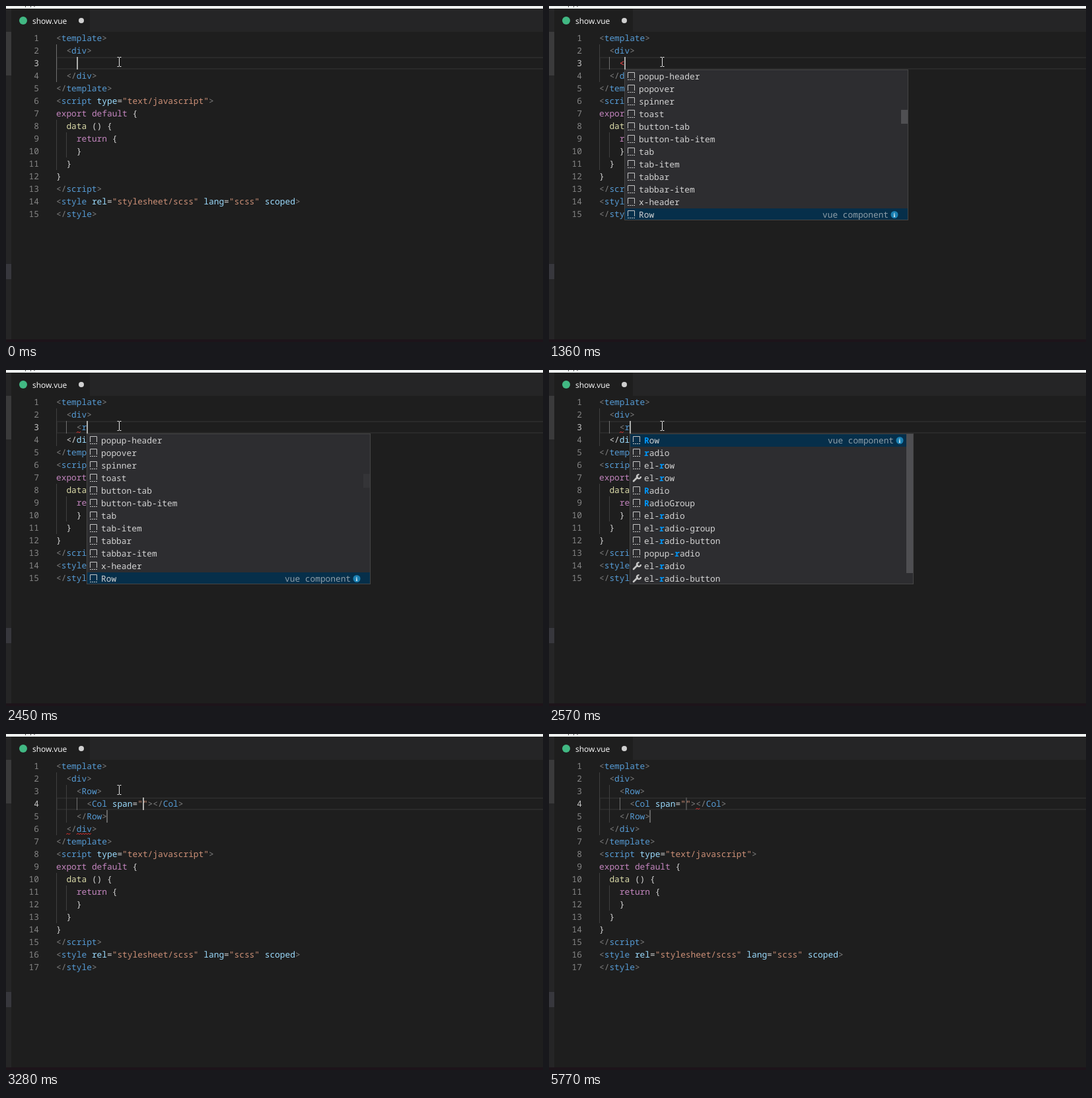
Write an HTML page that moves like this. It is 813 px wide and 508 px high and loops after 5.87 s.

```html
<!DOCTYPE html>
<html lang="en">
<head>
<meta charset="utf-8">
<title>Editor completion</title>
<style>
html, body { margin: 0; width: 100%; height: 100%; overflow: hidden; background: #1e1e1e; }
svg { display: block; }
text { font: 12.83px "Noto Sans Mono", "DejaVu Sans Mono", monospace; white-space: pre; text-rendering: geometricPrecision; }
text.ui { font: 12px "Open Sans", "Noto Sans", sans-serif; }
text.info { font: bold 8px "Noto Serif", serif; }
.hit { fill: #0097fb; font-weight: bold; }
</style>
</head>
<body>
<svg id="stage" width="813" height="508" viewBox="0 0 813 508"></svg>
<script>
const LOOP = 5870, LEFT = 76, TOP = 39, ROW = 19, CHAR = 7.7;

const tail = `</template>
<script type="text/javascript">
export default {
  data () {
    return {
    }
  }
}
<\/script>
<style rel="stylesheet/scss" lang="scss" scoped>
</style>`.split('\n');

const allTags = ['popup-header', 'popover', 'spinner', 'toast', 'button-tab', 'button-tab-item',
  'tab', 'tab-item', 'tabbar', 'tabbar-item', 'x-header', 'Row'];
const matches = ['Row', 'radio', 'el-row', '*el-row', 'Radio', 'RadioGroup', 'el-radio',
  'el-radio-group', 'el-radio-button', 'popup-radio', '*el-radio', '*el-radio-button'];

const fullMenu = { items: allTags, selected: 11, query: '', thumb: [157, 21, '#4f4f52'] };
const matchMenu = { items: matches, selected: 0, query: 'r', thumb: [97, 210, '#4f4f52'] };

// Each entry changes part of the editor state from its time on.
const steps = [
  [0, { typed: '', caret: 1, guide: 0, title: '#fff', waves: [], mouse: [171.5, 84] }],
  [560, { caret: 0 }],
  [960, { typed: '<', caret: 1 }],
  [1080, { guide: 2, invalid: 1 }],
  [1360, { menu: fullMenu }],
  [1510, { title: '#f48771', caret: 0 }],
  [1760, { title: '#fff', waves: [[2, 4, 1]] }],
  [2030, { caret: 1 }],
  [2450, { typed: '<r', invalid: 0, open: 1, menu: { ...fullMenu, thumb: [157, 21, '#343437'] } }],
  [2570, { menu: matchMenu }],
  [2690, { typed: '<ro', menu: { ...matchMenu, query: 'ro' } }],
  [3130, { caret: 0, waves: [[3, 2, 1], [3, 4, 3]] }],
  [3280, { done: 1, open: 0, menu: null, caret: 1, guide: 4, waves: [[5, 2, 1], [5, 4, 3]] }],
  [3780, { caret: 0, waves: [[3, 19, 1]] }],
  [4240, { caret: 1 }],
  [4810, { caret: 0 }],
  [5110, { mouse: [348.5, 282] }],
  [5230, { mouse: null, caret: 1 }],
  [5770, { caret: 0 }]
];

const syntax = [
  ['#808080', /<\/?|>/],
  ['#569cd6', /(?<=<\/?)\w+/],
  ['#ce9178', /".*?"/],
  ['#c586c0', /\b(?:export|default|return)\b/],
  ['#dcdcaa', /\bdata\b/],
  ['#9cdcfe', /\b(?:type|rel|lang|scoped|span)\b/],
  ['#d4d4d4', /[^\s<>"]/]
];
const tokens = new RegExp(syntax.map(([, re]) => `(${re.source})`).join('|'), 'g');

const colX = col => LEFT + col * CHAR;
const rowY = row => TOP + row * ROW;
const escape = s => s.replace(/</g, '&lt;');
const rect = (x, y, w, h, fill, more = '') =>
  `<rect x="${x}" y="${y}" width="${w}" height="${h}" fill="${fill}" ${more}/>`;
const text = (x, y, s, fill, more = '') => `<text x="${x}" y="${y}" fill="${fill}" ${more}>${s}</text>`;
const circle = (x, y, r, fill) => `<circle cx="${x}" cy="${y}" r="${r}" fill="${fill}"/>`;
const line = (d, color, more = '') => `<path d="${d}" fill="none" stroke="${color}" ${more}/>`;

function highlight(code, y) {
  let out = '';
  for (const m of code.matchAll(tokens)) {
    const kind = m.slice(1).findIndex(g => g !== undefined);
    out += text(colX(m.index), y, escape(m[0]), syntax[kind][0]);
  }
  return out;
}

function frame(title) {
  return rect(0, 0, 813, 508, '#1e1e1e') + rect(0, 4, 8, 500, '#252526') +
    rect(127, 4, 686, 35, '#252526') + rect(0, 39, 8, 66, '#3a3a3b') +
    rect(0, 390, 8, 23, '#37373d') + rect(0, 0, 813, 4, '#f0f4f3') +
    rect(29, 0, 1, 2, '#555') + rect(37, 0, 1, 2, '#555') + rect(42, 0, 2, 1, '#777') +
    rect(0, 504, 813, 4, '#1d141a') + circle(26, 22, 6, '#41b883') +
    text(40, 27, 'show.vue', title, 'class="ui"') + circle(114, 22, 4, '#cfcfcf');
}

function wave([row, col, length]) {
  const y = rowY(row) + 18, end = colX(col + length);
  let d = '';
  for (let x = colX(col), i = 0; x <= end; x += 2, i++) d += `${i ? 'L' : 'M'}${x} ${y - i % 2 * 2}`;
  return line(d, '#e8322f');
}

function editor(s) {
  const body = s.done ? ['    <Row>', '      <Col span=""></Col>', '    </Row>']
    : [s.typed ? '    ' + s.typed : '  '];
  const lines = ['<template>', '  <div>', ...body, '  </div>', ...tail];
  const current = s.done ? 3 : 2;
  const caretX = Math.round(colX(s.done ? 17 : 4 + s.typed.length) - .1);
  let out = rect(LEFT + 1, rowY(current) + 1, 800, ROW - 2, 'none', 'stroke="#2a2a2a" stroke-width="2"');

  lines.forEach((code, row) => {
    const y = rowY(row) + 14;
    out += text(50, y, row + 1, row === current ? '#c6c6c6' : '#858585', 'text-anchor="end"');
    for (let col = 0; col < code.search(/\S|$/); col += 2) {
      const active = row < 6 && col === s.guide;
      out += rect(Math.round(colX(col)), rowY(row), 1, ROW, active ? '#707070' : '#404040');
    }
    if (s.invalid && row === current) out += text(colX(4), y, '&lt;', '#f44747');
    else if (s.open && row === 3)
      out += text(colX(2), y, '&lt;/', '#d4d4d4') + text(colX(4), y, 'div', '#9cdcfe');
    else out += highlight(code, y);
  });

  out += s.waves.map(wave).join('');
  if (s.done) out += rect(207, rowY(3), 2, ROW, '#4a4a4a') + rect(152, rowY(4), 2, ROW, '#646464');
  if (s.caret) out += rect(caretX, rowY(current), 2, ROW, '#aeafad');
  return out;
}

// Marks the query letters in their order within a label.
function mark(label, query) {
  let next = 0;
  return [...label].map(c =>
    c.toLowerCase() === query[next] ? (next++, `<tspan class="hit">${c}</tspan>`) : c).join('');
}

function icon(x, y, wrench) {
  if (wrench) return line(`M${x + 1} ${y + 11}l6-6`, '#c5c5c5', 'stroke-width="2.6" stroke-linecap="round"') +
    line(`M${x + 9.5} ${y + 1.2}a3 3 0 1 0 2.4 2.8`, '#c5c5c5', 'stroke-width="2.4"');
  return line(`M${x + .5} ${y + 9}v-8.5h10v8.5`, '#c5c5c5') +
    line(`M${x} ${y + 11.5}h11`, '#c5c5c5', 'stroke-dasharray="2 1"');
}

function popup({ items, selected, query, thumb }, x) {
  let out = rect(x + .5, 96.5, 429, 227, '#2d2d30', 'stroke="#454545"');
  items.forEach((item, i) => {
    const y = 97 + i * ROW, wrench = item[0] === '*';
    if (i === selected) out += rect(x + 1, y, 428, Math.min(ROW, 323 - y), '#062f4a') +
      text(x + 300, y + 14, 'vue component', '#8f9ea8') + circle(x + 409, y + 9.5, 5.5, '#1b80b2') +
      text(x + 409, y + 12.5, 'i', '#fff', 'class="info" text-anchor="middle"');
    out += icon(x + 5, y + 3, wrench) +
      text(x + 22, y + 14, mark(wrench ? item.slice(1) : item, query), '#d4d4d4');
  });
  const [y, h, fill] = thumb;
  return out + rect(x + 419, y, 10, h, fill);
}

const pointer = ([x, y]) =>
  line(`M${x - 3} ${y - 6.5}h2.5M${x + .5} ${y - 6.5}h2.5M${x} ${y - 6}v13M${x - 3} ${y + 7.5}h2.5M${x + .5} ${y + 7.5}h2.5`, '#e4e4e4');

const stage = document.getElementById('stage');
let shown = -1;

function tick() {
  const t = performance.now() % LOOP;
  const past = steps.filter(([start]) => start <= t);
  if (past.length !== shown) {
    shown = past.length;
    const s = Object.assign({}, ...past.map(([, change]) => change));
    const menuX = Math.round(colX(4 + s.typed.length) - .1);
    stage.innerHTML = frame(s.title) + editor(s) +
      (s.menu ? popup(s.menu, menuX) : '') + (s.mouse ? pointer(s.mouse) : '');
  }
  requestAnimationFrame(tick);
}
tick();
</script>
</body>
</html>
```
